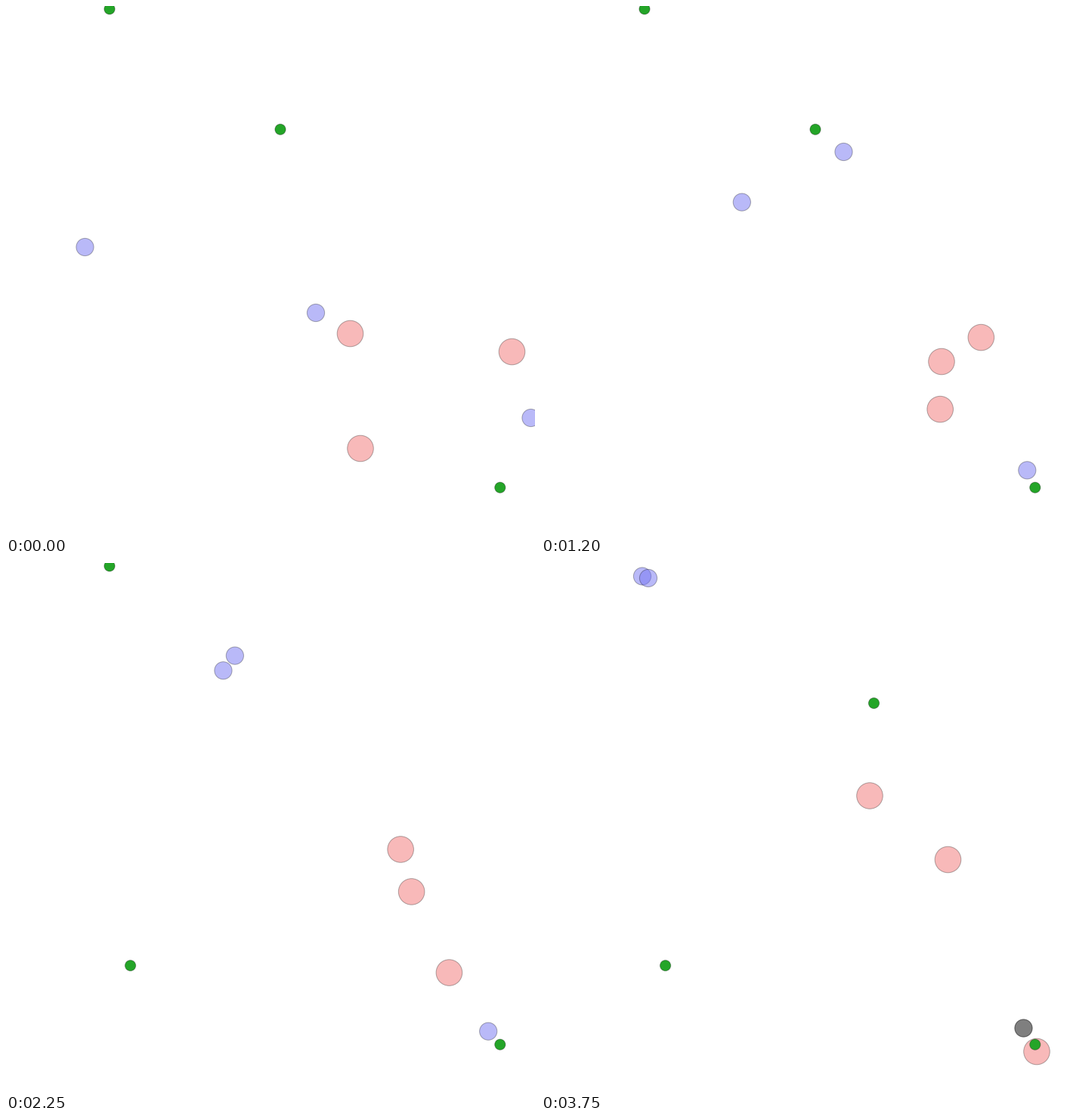
Animation of 700 by 700 pixels, one loop 3.9 s. Source, as a matplotlib script:

```python
import matplotlib.pyplot as plt
import numpy as np
from matplotlib.animation import FuncAnimation
from matplotlib.patches import Circle

SIZE = 700
FRAMES = 26
STEPS = np.arange(FRAMES)
CAUGHT = 21      # step at which the third prey dies


def glide(*keys):
    """Smooth cubic path through a few (step, x, y) keys."""
    t, *xy = np.array(keys, float).T
    i = np.clip(np.searchsorted(t, STEPS, side="right") - 1, 0, len(t) - 2)
    h = t[i + 1] - t[i]
    u = (STEPS - t[i]) / h
    ease = u * u * (3 - 2 * u)
    path = []
    for p in xy:
        v = np.gradient(p, t)
        bend = h * u * (1 - u) * ((1 - u) * v[i] - u * v[i + 1])
        path.append(p[i] + (p[i + 1] - p[i]) * ease + bend)
    return np.column_stack(path)


def walk(*keys):
    """Straight runs between the keys, resting at the last one."""
    t, x, y = np.array(keys, float).T
    return np.column_stack([np.interp(STEPS, t, x), np.interp(STEPS, t, y)])


def respawn(first, step=FRAMES, second=(0, 0)):
    """Stay in one place, then appear in another."""
    return np.where((STEPS < step)[:, None], first, second)


def rgba(r, g, b, a):
    return r / 255, g / 255, b / 255, a


RED = rgba(243, 116, 116, 0.5)
BLUE = rgba(116, 116, 243, 0.5)
GREEN = rgba(36, 165, 40, 1)
DEAD = rgba(0, 0, 0, 0.5)
EDGE = rgba(0, 0, 0, 0.3)

predators = [
    glide((0, 455.5, 433.5), (5, 511, 439.5), (8, 530, 470.5),
          (18, 610, 573), (25, 656, 646.5)),
    glide((0, 669.5, 457.5), (5, 611, 458.5), (13, 540, 391.5),
          (18, 495.5, 361), (25, 435, 308)),
    glide((0, 469, 585.5), (5, 515, 571), (13, 535, 455.5),
          (18, 537.5, 411), (25, 538.5, 392.5)),
]
prey = [
    glide((0, 104.5, 319), (5, 211, 303), (13, 308.5, 166),
          (18, 234, 104.5), (22, 155.5, 22), (25, 134, 17.5)),
    glide((0, 410, 406), (5, 410, 284), (8, 400.5, 193), (13, 344, 145.5),
          (18, 232.5, 87.5), (22, 150.5, 47.5), (25, 142, 20)),
    walk((0, 694.5, 545), (5, 645.5, 612), (18, 636, 622),
         (CAUGHT, 638.5, 615.5)),
]
food = [
    respawn((137, 4), 24, (440.5, 185.5)),
    respawn((363, 163.3), 10, (164.6, 532.7)),
    respawn((653.8, 637.2)),
]

fig = plt.figure(figsize=(7, 7), dpi=100, facecolor="white")
ax = fig.add_axes([0, 0, 1, 1])
ax.set_xlim(0, SIZE)
ax.set_ylim(SIZE, 0)
ax.axis("off")

dots = []
groups = [(predators, 17.3, RED), (prey, 11.6, BLUE), (food, 7.1, GREEN)]
for z, (paths, radius, color) in enumerate(groups):
    for path in paths:
        dot = Circle(path[0], radius, facecolor=color, edgecolor=EDGE,
                     linewidth=0.72, zorder=z)
        ax.add_patch(dot)
        dots.append((dot, path))
victim = dots[len(predators) + len(prey) - 1][0]


def update(n):
    for dot, path in dots:
        dot.center = path[n]
    dead = n >= CAUGHT
    victim.set_facecolor(DEAD if dead else BLUE)
    victim.set_edgecolor(DEAD if dead else EDGE)
    return [dot for dot, _ in dots]


anim = FuncAnimation(fig, update, frames=FRAMES, interval=150,
                     repeat=True, repeat_delay=0)
plt.show()
```
